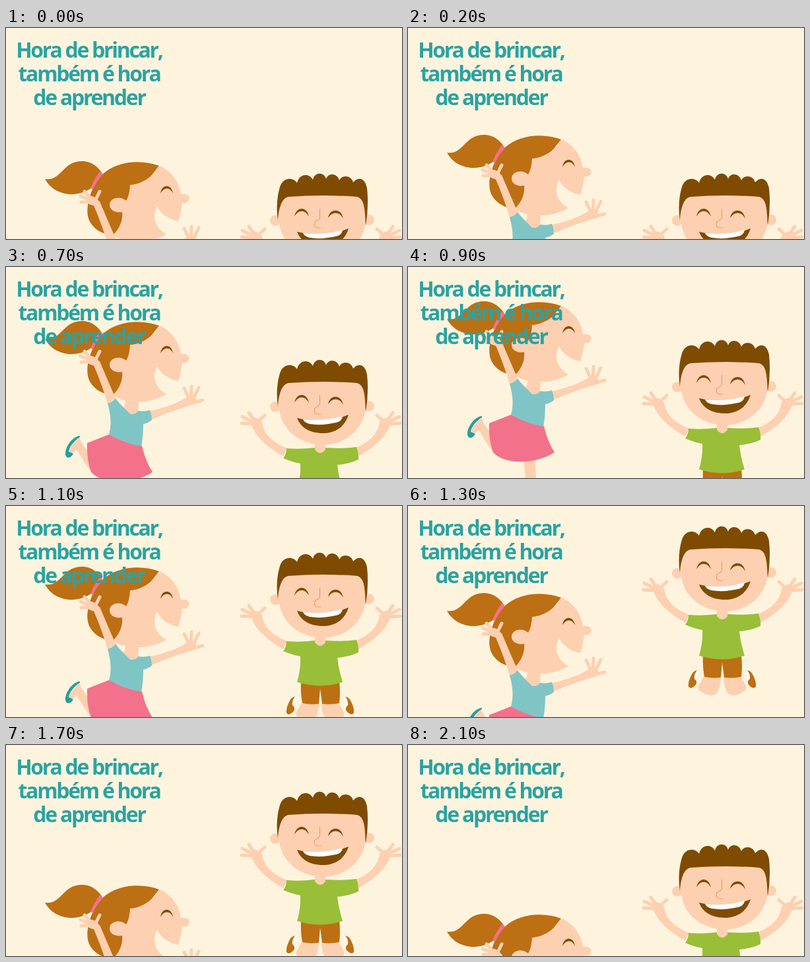
Animation of 600 by 320 pixels, one loop 2200 ms. Source, as an HTML page:

```html
<!DOCTYPE html>
<html lang="pt">
<head>
<meta charset="utf-8">
<style>
html, body { margin: 0; width: 100%; height: 100%; overflow: hidden; background: #fef4de }
svg { display: block }
text { font: 700 32px "Open Sans", "Noto Sans", sans-serif; letter-spacing: -2.3px; text-anchor: middle; fill: #2aa3a2 }
.skin { fill: #fdd0b1 }
.limb { fill: none; stroke: #fdd0b1; stroke-linecap: round; stroke-linejoin: round }
.auburn { fill: #bd6f13 }
.brown { fill: #7f4b00 }
.teal { fill: #2a9d9c }
</style>
</head>
<body>
<svg width="600" height="320" viewBox="0 0 600 320">
  <g id="girl">
    <!-- legs, skirt -->
    <path class="skin" d="M175 290H193L194 322H178Z M111 229Q97 241 95 253Q102 253 107 247Q113 256 119 267Q127 281 141 286L150 270L126 252Q118 244 111 229Z"/>
    <path class="teal" d="M112 226C101 227 90 242 90 253C90 261 98 261 102 253L95 250C96 242 104 233 112 228Z"/>
    <path fill="#f3718a" d="M156 224L206 241Q211 264 222 281C196 299 146 301 129 281Q122 263 123 237Z"/>
    <!-- far arm and hand -->
    <path class="skin" d="M216 189Q248 182 266 172L273 168L288 172Q281 180 270 183Q246 190 219 202Z"/>
    <path class="limb" stroke-width="5" d="M278 171L270 154M280 171L281 151M283 172L292 153M282 176L298 172"/>
    <circle class="skin" cx="280" cy="172" r="8"/>
    <!-- head -->
    <path class="auburn" d="M59 79C84 83 85 52 115 52C131 52 140 62 145 69L130 92C120 100 106 103 95 102C76 100 65 90 59 79Z"/>
    <path class="auburn" d="M232 59C205 49 169 51 146 72C130 88 119 120 125 139C130 154 146 163 162 165L190 140L200 100Z"/>
    <path class="skin" d="M232 59C249 65 262 82 265 102C274 101 280 105 277 111C275 116 270 116 267 115Q266 128 261 143C244 140 233 130 229 120C221 136 225 153 243 163C231 170 215 175 201 174L199 192L188 196L176 188Q183 180 181 172Q171 171 162 164C174 152 177 140 176 129C165 131 157 126 157 118C157 109 171 103 182 112Q187 105 188 88C207 87 224 74 232 59Z"/>
    <path fill="#f3718a" d="M142 68Q145 68 147 72Q137 82 132 95L128 93Q134 78 142 68Z"/>
    <path class="brown" d="M234 101C236 86 251 86 253 101C249 91 239 91 234 101Z"/>
    <!-- near arm and hand -->
    <path class="skin" d="M132 117L142 113Q153 139 166 169L154 178Q147 152 132 117Z"/>
    <path class="limb" stroke-width="5" d="M130 110L119 98M130 112L113 105M130 114L114 114M135 112L142 98"/>
    <path class="skin" d="M124 105Q135 103 142 114L136 120Q127 119 122 114Z"/>
    <!-- shirt -->
    <path fill="#80c5c5" d="M166 169Q174 181 190 193Q198 193 200 188Q209 190 218 187Q221 194 221 202Q215 207 208 208Q208 227 205 242Q178 237 156 224Q162 205 154 177Q161 175 166 169Z"/>
    <path class="skin" d="M166 169Q176 181 188 193Q196 193 200 188L201 173L181 171Q181 180 178 182Z"/>
  </g>
  <g id="boy">
    <!-- arm and hand, mirrored for the other side -->
    <g id="arm">
      <path class="skin" d="M372 130Q381 155 420 177L426 165Q390 151 388 124Z"/>
      <path class="limb" stroke-width="5" d="M376 123L368 111M374 125L358 117M374 128L357 127M382 124L392 115"/>
      <path class="skin" d="M371 119Q381 116 388 126L384 133Q376 133 369 129Z"/>
    </g>
    <use href="#arm" transform="matrix(-1 0 0 1 954 0)"/>
    <!-- legs, shoes -->
    <g id="leg">
      <path class="skin" d="M449 257L440 273Q438 279 445 282Q452 288 461 287Q468 286 470 280Q474 270 474 259Z"/>
      <path fill="#fff" d="M433 256Q438 248 440 253Q436 262 439 264L433 272Z"/>
      <path class="auburn" d="M438 249Q432 250 429 257Q424 267 425 274Q429 279 436 271Q439 266 434 262Q433 255 438 249Z"/>
    </g>
    <use href="#leg" transform="matrix(-1 0 0 1 952 0)"/>
    <path class="auburn" d="M447 226H505Q507 243 505 259Q492 262 479 260L476 237L474 260Q461 262 449 259Q446 243 447 226Z"/>
    <path fill="#98bf37" d="M425 165Q446 167 468 164H484Q508 166 531 163Q535 173 534 182Q519 189 502 190Q504 208 510 227Q477 238 441 227Q447 207 446 188Q431 185 420 180Q425 174 425 165Z"/>
    <path class="skin" d="M468 152H484V167Q476 177 468 167Z"/>
    <!-- head -->
    <circle class="skin" cx="408" cy="102" r="8"/>
    <circle class="skin" cx="550" cy="101" r="8"/>
    <path class="skin" d="M412 60H546Q549 95 542 118C532 146 505 160 481 160C451 160 424 143 416 116Q410 95 412 60Z"/>
    <path class="brown" d="M412 102Q408 75 415 51C420 36 435 36 441 45C444 31 459 29 465 40C468 28 482 28 485 39C488 29 502 30 505 41C509 32 523 33 526 44C534 35 544 37 547 53Q550 80 545 110C544 84 543 69 532 66Q480 62 428 66C417 68 413 85 412 102Z"/>
    <path class="brown" d="M437 96C440 80 456 80 459 96C453 85 443 85 437 96ZM488 98C491 83 508 83 511 99C505 88 495 88 488 98ZM441 119Q482 129 519 114C513 134 497 142 480 142C460 142 446 133 441 119Z"/>
    <path fill="#fff" d="M450 121Q482 125 510 116Q509 124 500 126Q478 131 460 128Q452 126 450 121Z"/>
    <path fill="none" stroke="#ee9c6c" stroke-width="1.200" d="M475.500 84V97Q475 101 471 102C466 104 466 111 471 113H477"/>
  </g>
  <text x="126" y="45">Hora de brincar,</text>
  <text x="126" y="81">também é hora</text>
  <text x="126" y="117">de aprender</text>
</svg>
<script>
const STEP = 100, LOOP = 2200;

// Offsets per step: a start value followed by [change, repeats] runs.
const track = (start, ...runs) => runs.reduce((list, [by, count]) => {
  while (count--) list.push(list.at(-1) + by);
  return list;
}, [start]);

const tracks = {
  girl: track(150, [-20, 3], [0, 1], [-20, 3], [-10, 1], [-20, 1], [20, 10], [4, 1], [0, 1]),
  boy: track(190, [20, 1], [-20, 2], [0, 1], [-20, 3], [-10, 1], [-20, 6], [20, 7])
};

function draw(now) {
  const i = Math.floor(now % LOOP / STEP);
  for (const id in tracks)
    document.getElementById(id).setAttribute("transform", `translate(0 ${tracks[id][i]})`);
  requestAnimationFrame(draw);
}
draw(performance.now());
</script>
</body>
</html>
```
